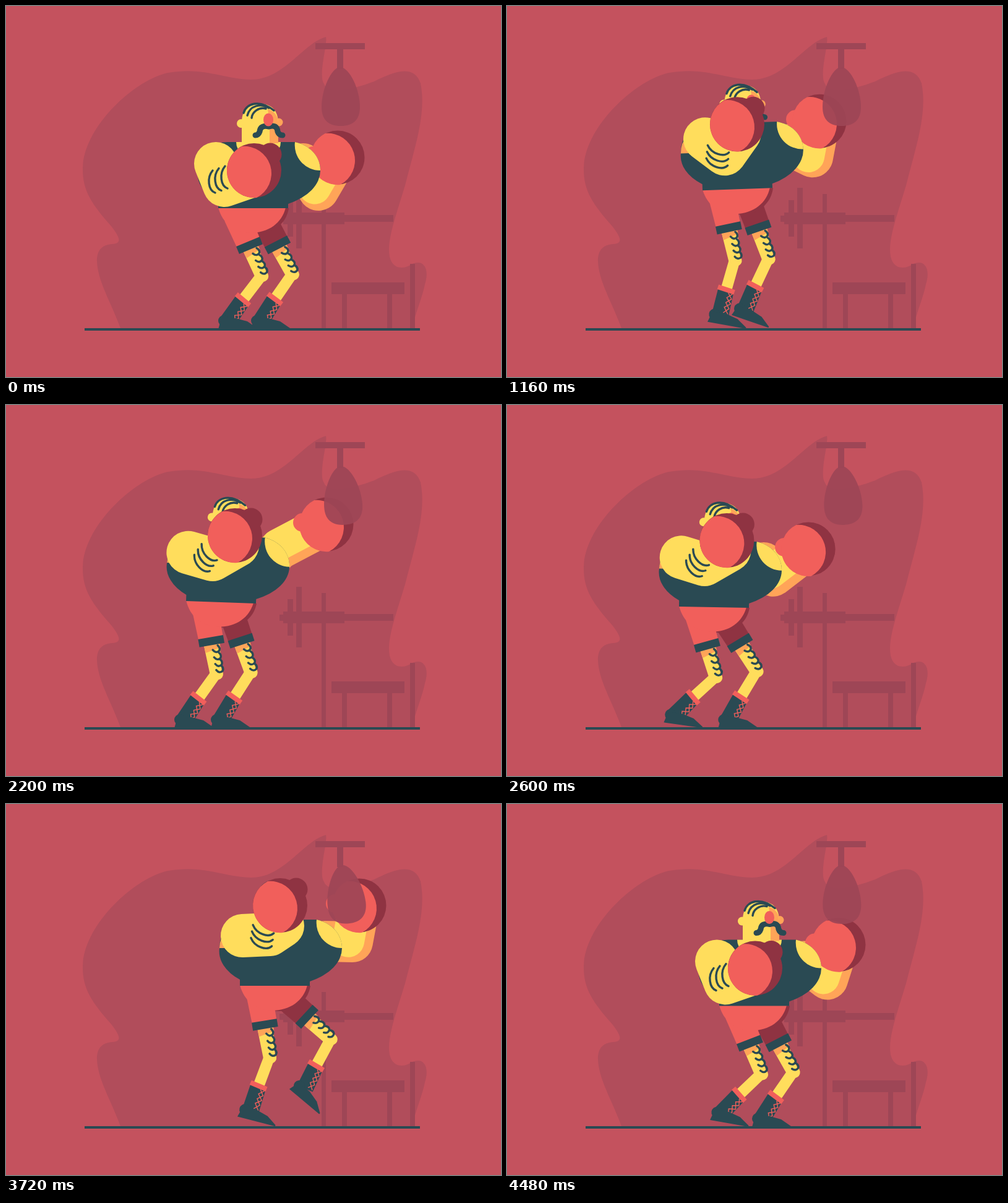
An HTML page for the animation above (4520 ms loop, 800 by 600 pixels).

```html
<!DOCTYPE html>
<html lang="en">
<head>
<meta charset="utf-8">
<title>Boxer</title>
<style>
html,body{margin:0;width:100%;height:100%;overflow:hidden;background:#c4525e}
svg{display:block;width:100vw;height:100vh}
.teal{fill:#2a4a53}.skin{fill:#ffdd5c}.shade{fill:#ffa458}.red{fill:#f15f5b}.dark{fill:#8f3342}.gym{fill:#9e4656}
.line{fill:none;stroke:#2a4a53;stroke-width:3.4;stroke-linecap:round}
.lace{fill:none;stroke:#f15f5b;stroke-width:1.4}
.limb{fill:none;stroke-linecap:round;stroke-linejoin:round}
</style>
</head>
<body>
<svg id="stage" viewBox="0 0 800 600"></svg>
<script>
const LOOP = 4520, STEP = 40, THIGH = 100, SHIN = 88;

const gym = [[500,60,80,10],[535,70,10,32],[442,339,8,10],[448,334,99,19],[547,338,79,11],
  [455,314,9,59],[469,294,9,98],[510,304,7,217],[526,447,118,19],[543,466,8,55],[616,466,8,55],[653,417,8,104]]
  .map(([x,y,w,h]) => `<rect class="gym" x="${x}" y="${y}" width="${w}" height="${h}"/>`).join('');

const lens = '<path class="red" d="M-20-39A44 44 0 0 0 4 44A44 44 0 0 0-20-39Z"/>';

const thigh = (side, cloth) => `<g id="thigh${side}">
  <path class="skin" d="M-13 50H13L8 100L-11 104Z"/><path class="shade" d="M-13 50H13V58L-12 63Z"/>
  <circle class="skin" cx="1" cy="100" r="9"/>
  ${[60,72,83,93].map(y => `<path class="line" d="M0 ${y}q4 7 10 3q3-4-1-9"/>`).join('')}
  <path class="${cloth}" d="M-22-6H20V42H-20Z"/><rect class="teal" x="-20.5" y="39" width="41" height="13"/></g>`;

const shin = side => `<g id="shin${side}">
  <path class="skin" d="M-11-4L7 2L9 47H-9Z"/>
  <path class="teal" d="M-13 50H13L17 88L-10 92Z"/><rect class="red" x="-14" y="45" width="28" height="8"/>
  <path class="lace" d="M12 53L5 61L14 69L6 77L15 86M5 53L13 61L6 69L14 77L7 86"/></g>
  <g id="foot${side}"><circle class="teal" cx="-6" cy="4" r="9"/>
  <path class="teal" d="M-15 18L-10 0H13L32 5L48 16V18Z"/></g>`;

stage.innerHTML = `
<path fill="#b14d5b" d="M185 521C168 475 148 445 147 412C147 395 155 386 172 385C188 384 184 374 170 356C140 322 124 300 124 264C124 195 210 118 262 108C320 98 350 118 396 119C450 119 480 60 517 50C520 62 504 112 514 126C522 146 565 133 595 122C630 104 660 95 670 125C680 175 660 230 645 290C630 340 615 380 620 405C625 428 645 425 655 418C675 408 685 425 677 450C672 475 660 500 657 521Z"/>
${gym}
<rect class="teal" x="127" y="521" width="542" height="4"/>
<path id="backArm" class="limb" stroke="#ffa458" stroke-width="66"/>
<path id="backFore" class="limb" stroke="#ffdd5c" stroke-width="52"/>
<g id="backGlove"><circle class="dark" r="43.5"/><circle class="red" cx="-39" cy="-3" r="15"/>${lens}</g>
${shin('R')}${thigh('R', 'dark')}${shin('L')}
<g id="seat"><path class="dark" d="M-20 0H57C55 12 50 20 45 25C30 44 0 44-12 36Z"/></g>
${thigh('L', 'red')}
<g id="torso">
  <path class="red" d="M-57-1H52C46 24 24 40-5 40C-30 40-50 25-57-1Z"/>
  <path class="teal" d="M-57 0V-10A99 61 0 0 1-90-61C-90-92-65-107-42-107H67C90-102 108-85 108-61A99 61 0 0 1 56-7V0Z"/>
  <path class="shade" d="M-90-61H-50V-90H-78Q-90-78-90-61Z"/>
  <path class="skin" d="M67-107C90-102 108-85 108-61A41 41 0 0 1 67-107Z"/>
  <g id="head">
    <path class="skin" d="M372 220A36 30 0 0 0 444 220Z"/>
    <circle class="skin" cx="380" cy="190" r="7"/><circle class="shade" cx="441" cy="188" r="6.5"/>
    <path class="skin" d="M381 223V188C381 168 392 158 410 158C430 158 440 170 440 190V222Z"/>
    <path class="shade" d="M423 167Q440 172 440 190V222H426V185Z"/>
    <path class="line" d="M384 173C388 158 409 150 433 169M390 177C394 161 411 157 425 165M397 181C398 171 409 163 420 166"/>
    <path class="limb" stroke="#2a4a53" stroke-width="9" d="M425 195Q411 192 410 203Q408 209 403 209M425 195Q438 191 439 203Q441 209 447 209"/>
    <ellipse class="red" cx="424" cy="184" rx="8" ry="10.5"/>
  </g>
</g>
<path id="frontArm" class="limb" stroke="#ffdd5c" stroke-width="70"/>
<g id="marks">${[0,1,2].map(i => `<path class="line" transform="translate(${i*10-21} ${3-i*3.5})" d="M2-27C-8-15-5 5 6 9"/>`).join('')}</g>
<g id="frontGlove"><circle class="dark" r="44"/><circle class="dark" cx="26" cy="-26" r="18.5"/>${lens}</g>
<g id="bag" opacity=".92"><path class="gym" d="M540 99C555 99 572 135 572 163C572 185 560 194 541 194C522 194 510 185 510 163C510 135 526 99 540 99Z"/></g>`;

// Pose tracks, one value per key time, measured from the waist
const keys = [0, 440, 1160, 2200, 2960, 3720, 4480];
const tracks = {
  tilt:   [0, -5, -2, 2, 0, 0, 0],
  nod:    [0, 0, 4, 0, 2, -12, 0],
  curl:   [0, 0, -65, -37, -40, -62, 0],
  cuff:   [6, 6, 14, 16, 16, 33, 6],
  elbowX: [-47, -45, -21, -14, -17, -9, -47],
  elbowY: [-37, -34, -57, -69, -69, -83, -37],
  gloveX: [1, -2, -1, 22, 19, 8, 1],
  gloveY: [-61, -63, -105, -108, -108, -130, -61],
  backElbowX: [105, 123, 121, 94, 96, 125, 118],
  backElbowY: [-29, -59, -52, -86, -20, -71, -43],
  backGloveX: [136, 127, 132, 170, 137, 136, 136],
  backGloveY: [-82, -118, -110, -126, -67, -130, -99],
  footLX: [-42, -38, -31, -61, -67, -42, -54],
  footLUp: [0, 8, -3, -4, 17, 0, 9],
  footRX: [11, 13, 10, -2, 41, 46, 11],
  footRUp: [0, -1, 5, -4, 0, 35, 0]
};
const swayTimes = [0, 170, 440, 640, 900, 1160, 1310, 1600, 1900, 2200, 2600, 2960, 3340, 3500, 3720, 3910, 4150, 4480];
const swayX = [400, 444, 335, 340, 392, 373, 444, 333, 335, 348, 335, 455, 412, 455, 435, 343, 336, 400];
const landings = [0, 410, 730, 1040, 1360, 1650, 1930, 2250, 2600, 2955, 3270, 3590, 3910, 4220, 4490, LOOP];
const bagHits = [2192, 3700];

function sample(times, values, t) {
  let i = times.length - 1;
  while (times[i] > t) i--;
  const end = times[i + 1] ?? LOOP;
  const p = (t - times[i]) / (end - times[i]);
  const ease = (1 - Math.cos(Math.PI * p)) / 2;
  return values[i] + (values[(i + 1) % values.length] - values[i]) * ease;
}

function hopHeight(t) {
  const i = landings.findIndex(l => l > t), start = landings[i - 1], span = landings[i] - start;
  return 36 * Math.min(1, span / 280) * Math.sin(Math.PI * (t - start) / span) ** 2;
}

const $ = id => document.getElementById(id);
const place = (id, x, y, angle = 0) => $(id).setAttribute('transform', `translate(${x} ${y}) rotate(${angle})`);
const trace = (id, ...points) => $(id).setAttribute('d', 'M' + points.map(p => p.join(' ')).join('L'));
const limbAngle = (from, to) => -Math.atan2(to[0] - from[0], to[1] - from[1]) * 180 / Math.PI;

function poseLeg(side, hip, ankle, footAngle) {
  const dx = ankle[0] - hip[0], dy = ankle[1] - hip[1], dist = Math.hypot(dx, dy);
  const d = Math.min(dist, THIGH + SHIN - 1), ux = dx / dist, uy = dy / dist;
  const along = (d * d + THIGH ** 2 - SHIN ** 2) / (2 * d);
  const out = Math.sqrt(Math.max(0, THIGH ** 2 - along ** 2));
  const knee = [hip[0] + ux * along + uy * out, hip[1] + uy * along - ux * out];
  const heel = [hip[0] + ux * d, hip[1] + uy * d];
  place('thigh' + side, ...hip, limbAngle(hip, knee));
  place('shin' + side, ...knee, limbAngle(knee, heel));
  place('foot' + side, ...heel, footAngle);
}

function draw(t) {
  const p = {};
  for (const name in tracks) p[name] = sample(keys, tracks[name], t);
  const lift = hopHeight(t), x = sample(swayTimes, swayX, t), y = 327 - lift;
  const at = (dx, dy) => [x + dx, y + dy];

  place('torso', x, y, p.tilt);
  place('seat', x, y, p.tilt);
  $('head').setAttribute('transform', `translate(-400 -327) rotate(${p.nod} 402 220)`);

  for (const [side, hx, hy] of [['L', -24, 18], ['R', 18, 19]]) {
    const up = Math.max(0, 0.4 * lift + p[`foot${side}Up`]);
    poseLeg(side, at(hx, hy), [x + p[`foot${side}X`], 505 - up], Math.min(40, up * 1.1));
  }

  const raise = Math.min(1, -p.curl / 40);
  const elbow = at(p.elbowX, p.elbowY), glove = at(p.gloveX, p.gloveY);
  trace('frontArm', at(-61 + 8 * raise, -72 - 9 * raise), elbow, [glove[0] + 4, glove[1] + p.cuff]);
  place('marks', ...elbow, p.curl);
  place('frontGlove', ...glove);

  const backElbow = at(p.backElbowX, p.backElbowY), backGlove = at(p.backGloveX, p.backGloveY);
  const fx = backGlove[0] - backElbow[0], fy = backGlove[1] - backElbow[1], len = Math.hypot(fx, fy);
  const inset = ([px, py]) => [px + fy / len * 7, py - fx / len * 7];
  trace('backArm', at(80, -72), backElbow, backGlove);
  trace('backFore', inset(backElbow), inset(backGlove));
  place('backGlove', ...backGlove);

  const swing = bagHits.reduce((sum, hit) => {
    const s = t - hit;
    return s < 0 ? sum : sum - 20 * Math.exp(-s / 230) * Math.sin(s * Math.PI / 190);
  }, 0);
  $('bag').setAttribute('transform', `rotate(${swing} 540 70)`);
}

const begin = performance.now();
function tick() {
  const t = (performance.now() - begin) % LOOP;
  draw(Math.floor(t / STEP) * STEP);
  requestAnimationFrame(tick);
}
tick();
</script>
</body>
</html>
```
